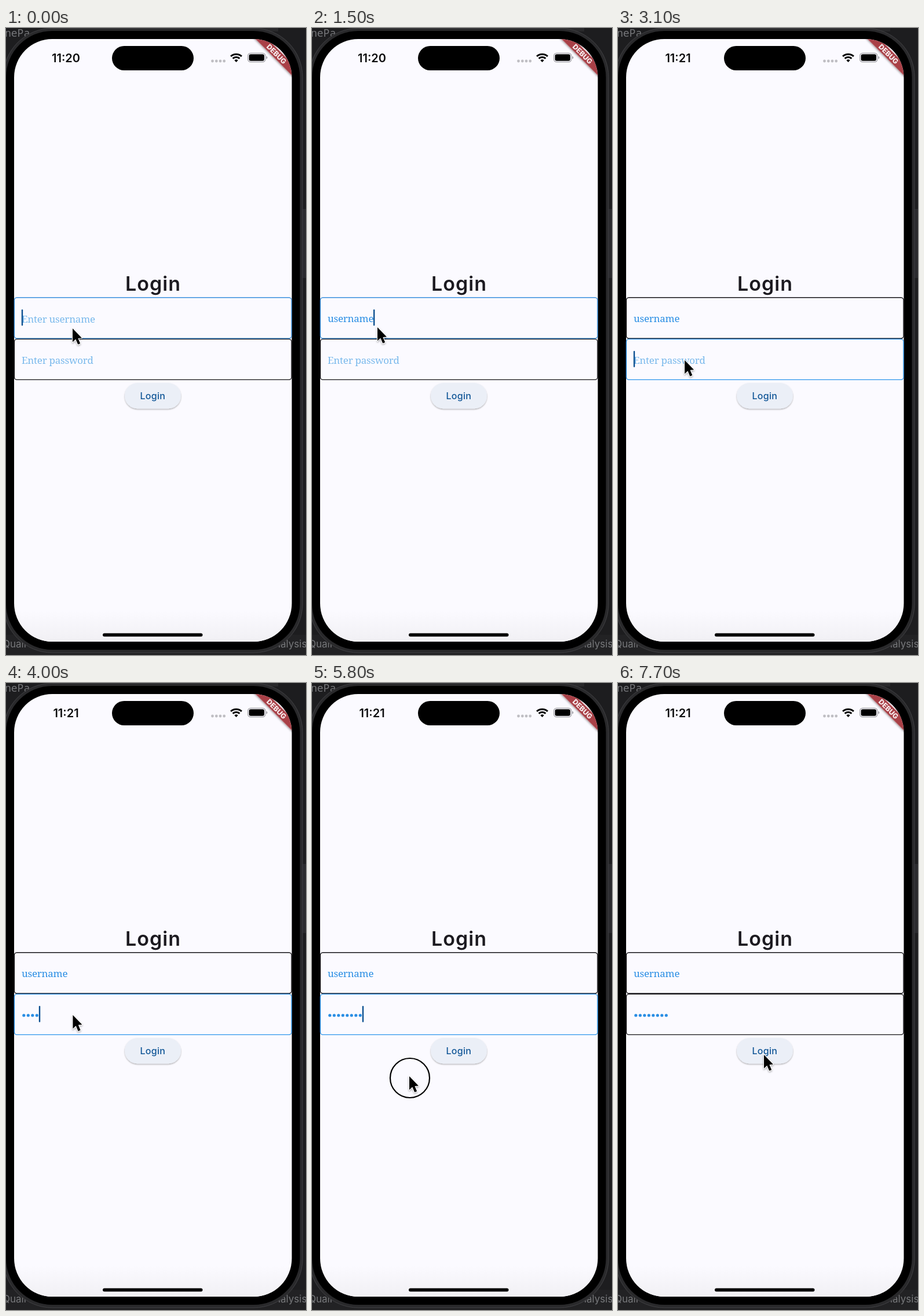
Recreate the animation shown at these times as an HTML page. Size 518 by 1081 pixels, loop 7800 ms.

```html
<!DOCTYPE html>
<html lang="en">
<head>
<meta charset="utf-8">
<title>Login screen</title>
<style>
  html, body { margin: 0; width: 100%; height: 100%; overflow: hidden; background: #1d1d1f; }
  svg { display: block; width: 100%; height: 100%; }
  text { font-family: Inter, Roboto, sans-serif; }
  .mid { text-anchor: middle; }
  .backdrop { fill: #77787b; font-size: 17px; }
  .entry { font-family: "Noto Serif", serif; font-size: 17px; letter-spacing: -.25px; fill: #2a8ee4; }
  .hint { fill: #79b9ec; }
  .field { fill: none; stroke-width: 1.4; }
</style>
</head>
<body>
<svg viewBox="0 0 518 1081" xmlns="http://www.w3.org/2000/svg">
  <defs>
    <clipPath id="screen"><rect x="14" y="19" width="479.5" height="1039" rx="66"/></clipPath>
    <linearGradient id="foot" x1="0" y1="0" x2="0" y2="1">
      <stop offset="0" stop-color="#f1f0f4" stop-opacity="0"/>
      <stop offset="1" stop-color="#f1f0f4"/>
    </linearGradient>
    <filter id="soft" x="-30%" y="-30%" width="160%" height="180%">
      <feDropShadow dx="0" dy="1.4" stdDeviation="1.2" flood-color="#000" flood-opacity=".32"/>
    </filter>
    <filter id="lift" x="-50%" y="-50%" width="200%" height="200%">
      <feDropShadow dx="0" dy="1.6" stdDeviation="1.5" flood-color="#000" flood-opacity=".35"/>
    </filter>
  </defs>

  <!-- Desktop behind the phone -->
  <rect width="518" height="1081" fill="#1d1d1f"/>
  <rect x="412" width="58" height="6" fill="#29292b"/>
  <rect x="512" y="312" width="6" height="119" fill="#2b2b2e"/>
  <rect y="1046" width="518" height="35" fill="#222224"/>
  <text class="backdrop" x="-2" y="15" style="font-family:'Noto Sans Mono',monospace;font-size:18px">nePa</text>
  <text class="backdrop" x="-6" y="1068">Quali</text>
  <text class="backdrop" x="464" y="1068">nalysis</text>

  <!-- Phone body -->
  <rect x="-4.5" y=".5" width="516.5" height="1076.5" rx="84" fill="#29292b" stroke="#414144"/>
  <rect x="0" y="5" width="507.5" height="1067" rx="80"/>

  <g clip-path="url(#screen)">
    <rect x="14" y="19" width="480" height="1039" fill="#fbfaff"/>
    <rect x="14" y="1005" width="480" height="53" fill="url(#foot)"/>
    <g transform="translate(467.2 44.8) rotate(45)">
      <rect x="-60" y="-7.4" width="120" height="14.8" fill="#a94146" filter="url(#lift)"/>
      <text class="mid" y="4.4" font-size="12.2" font-weight="800" fill="#f8eef0">DEBUG</text>
    </g>
  </g>

  <!-- Status bar -->
  <text id="clock" class="mid" x="103.5" y="59" font-size="20" font-weight="600" fill="#0b0b0c"></text>
  <rect x="183" y="31" width="141" height="42" rx="21"/>
  <g fill="#bfbec3">
    <circle cx="356.5" cy="57" r="2.4"/><circle cx="363.3" cy="57" r="2.4"/>
    <circle cx="370" cy="57" r="2.4"/><circle cx="376.7" cy="57" r="2.4"/>
  </g>
  <g fill="none" stroke="#000" stroke-width="3">
    <path d="M388.1 48.9a13.8 13.8 0 0 1 18.8 0M391.6 52.7a8.6 8.6 0 0 1 11.8 0"/>
    <path d="M397.5 59l-3.1 -3.3a4.5 4.5 0 0 1 6.2 0z" fill="#000" stroke="none"/>
  </g>
  <rect x="417.5" y="43.3" width="30.5" height="15.4" rx="5" fill="none" stroke="#a3a2a8" stroke-width="1.2"/>
  <rect x="419.5" y="45.3" width="26.5" height="11.4" rx="3.2"/>
  <path d="M449.3 48.5q2.2 .8 2.2 2.5t-2.2 2.5z" fill="#a3a2a8"/>

  <!-- Form -->
  <text class="mid" x="254" y="453" font-size="34" font-weight="600" letter-spacing="1" fill="#1c1a20">Login</text>
  <rect id="userBox" class="field" x="14.4" y="464.7" width="478.6" height="70.6" rx="4.5"/>
  <rect id="passBox" class="field" x="14.4" y="536.4" width="478.6" height="70" rx="4.5"/>
  <text id="userHint" class="entry hint" x="27" y="508">Enter username</text>
  <text id="userText" class="entry" x="27" y="507"></text>
  <text id="passHint" class="entry hint" x="27" y="579">Enter password</text>
  <g id="dots" fill="#2a8ee4"></g>
  <rect id="caret" width="2.4" height="28" rx="1" fill="#0c4f90"/>
  <rect x="205" y="612" width="97" height="44.3" rx="22.1" fill="#ebeff7" filter="url(#soft)"/>
  <text class="mid" x="253.3" y="640" font-size="16" font-weight="500" letter-spacing=".3" fill="#0f5596">Login</text>
  <rect x="167" y="1043.4" width="172.5" height="5.8" rx="2.9"/>

  <g id="pointer">
    <circle id="ring" cx="1" cy="3" r="34" fill="none" stroke="#000" stroke-width="2.2"/>
    <path d="M0 0V23.5L5.3 18.4L9.2 27.6L13.2 25.9L9.4 16.9L16 16.4Z"
          stroke="#fff" stroke-width="2" paint-order="stroke" stroke-linejoin="round" filter="url(#lift)"/>
  </g>
</svg>
<script>
const LOOP = 7800, STEP = 100;
const NAME = "username";
const NAME_START = 600, NAME_GAP = 100;
const PASS_LENGTH = 8, PASS_START = 3500, PASS_GAP = 160;
const FOCUS_PASS = 2650, MINUTE = 3100, BLUR = 5850;
const PRESSES = [[2400, 2650], [5800, 6050], [6400, 6650]];
// Pointer tip: time, x, y
const PATH = [
  [0, 115, 518], [400, 115, 518], [1200, 113, 516], [1800, 113, 516],
  [2300, 115, 573], [4700, 115.5, 572.5], [5100, 157, 642], [5200, 168, 678],
  [6050, 168, 678], [6350, 252, 641], [LOOP, 252, 641]
];

const $ = id => document.getElementById(id);
const [clock, userBox, passBox, userHint, userText, passHint, dots, caret, ring, pointer] =
  ["clock", "userBox", "passBox", "userHint", "userText", "passHint", "dots", "caret", "ring", "pointer"].map($);

for (let i = 0; i < PASS_LENGTH; i++) {
  const dot = document.createElementNS("http://www.w3.org/2000/svg", "circle");
  dot.setAttribute("cx", 30.8 + i * 7.5);
  dot.setAttribute("cy", 573);
  dot.setAttribute("r", 2.6);
  dots.append(dot);
}

const show = (el, on) => el.setAttribute("visibility", on ? "visible" : "hidden");
const setText = (el, value) => { if (el.textContent !== value) el.textContent = value; };
const typed = (t, start, gap, max) => Math.max(0, Math.min(max, Math.floor((t - start) / gap) + 1));

function tipAt(t) {
  const i = PATH.findIndex(p => p[0] > t);
  const [t0, x0, y0] = PATH[i - 1], [t1, x1, y1] = PATH[i];
  const u = (t - t0) / (t1 - t0), k = u * u * (3 - 2 * u);
  return [x0 + (x1 - x0) * k, y0 + (y1 - y0) * k];
}

// The caret stays lit after each key, then blinks once a second.
function caretLit(t, start, gap, count, focusTime) {
  const last = count ? start + (count - 1) * gap : focusTime;
  return (t - last) % 1000 < 520;
}

function draw(t) {
  const letters = typed(t, NAME_START, NAME_GAP, NAME.length);
  const marks = typed(t, PASS_START, PASS_GAP, PASS_LENGTH);
  const onUser = t < FOCUS_PASS, onPass = !onUser && t < BLUR;

  setText(clock, t < MINUTE ? "11:20" : "11:21");
  setText(userText, NAME.slice(0, letters));
  show(userHint, letters === 0);
  show(passHint, marks === 0);
  [...dots.children].forEach((dot, i) => show(dot, i < marks));

  userBox.setAttribute("stroke", onUser ? "#3a90de" : "#141316");
  passBox.setAttribute("stroke", onPass ? "#2c95ec" : "#141316");

  if (onUser) {
    const x = letters ? 27 + userText.getComputedTextLength() - .3 : 26.8;
    caret.setAttribute("x", x);
    caret.setAttribute("y", 485.3);
    show(caret, caretLit(t, NAME_START, NAME_GAP, letters, 0));
  } else {
    caret.setAttribute("x", 26.8 + marks * 7.5);
    caret.setAttribute("y", 556.8);
    show(caret, onPass && caretLit(t, PASS_START, PASS_GAP, marks, FOCUS_PASS));
  }

  const [x, y] = tipAt(t);
  pointer.setAttribute("transform", `translate(${x} ${y})`);
  show(ring, PRESSES.some(([from, to]) => t >= from && t < to));
}

const began = performance.now();
function tick() {
  const t = (performance.now() - began) % LOOP;
  draw(Math.floor(t / STEP) * STEP);
  requestAnimationFrame(tick);
}
tick();
</script>
</body>
</html>
```
